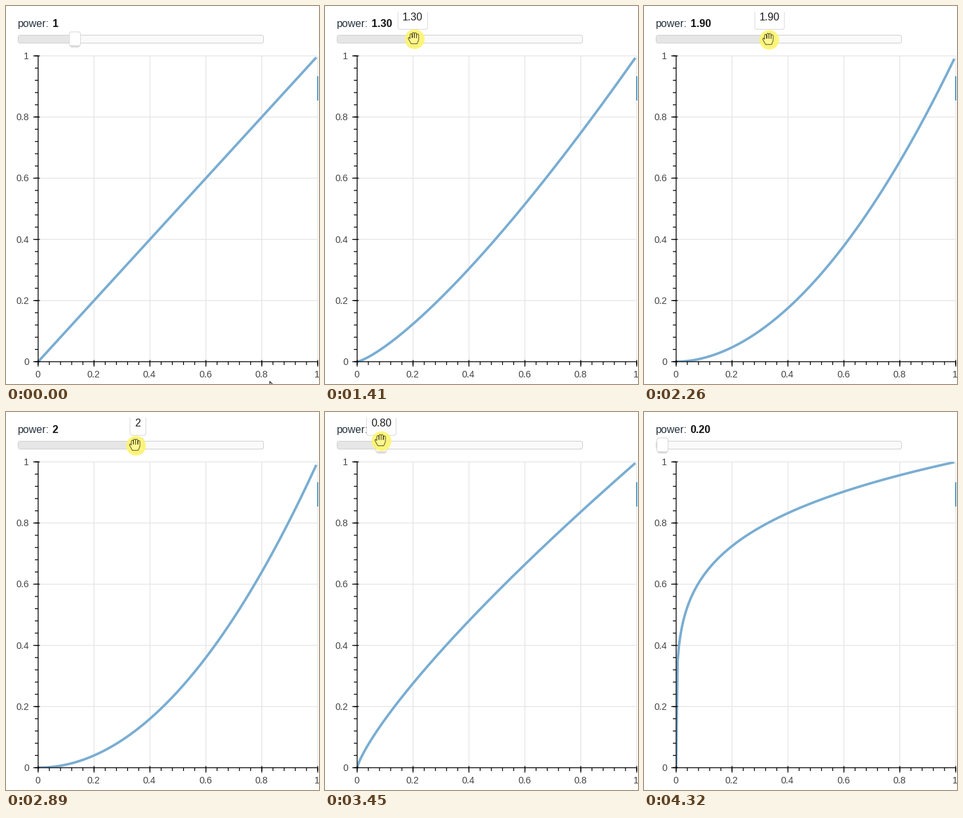
A matplotlib script that plays this animation: 477 px wide and 576 px high, repeating every 4.99 s.

```python
import numpy as np
import matplotlib.pyplot as plt
from matplotlib.animation import FuncAnimation
from matplotlib.collections import LineCollection
from matplotlib.patches import Circle, FancyBboxPatch, Polygon, Rectangle

W, H, DPI = 477, 576, 72
LOOP, STEP = 4990, 10
FPS = 24
LEFT, RIGHT, TOP, BOTTOM = 49, 475, 76, 542
FONT = "Liberation Sans"

# Pointer path: start and end (ms), shift in x and y, easing power
APPROACH = (0, 560, -295, -522, 1.8)
DRAG_OUT = (1000, 2590, 101, 2, 1.15)
DRAG_BACK = (2830, 3750, -177, -11, 1.15)
LEAVE = (4090, 4280, 420, 690, 0.6)
MOVES = (APPROACH, DRAG_OUT, DRAG_BACK, LEAVE)
POINTER_START = (402, 572)
PRESS, RELEASE = 840, 4110

ARROW = np.array([(0, 0), (0, 16), (3.7, 12.5), (6.3, 18.3), (8.6, 17.3),
                  (6.1, 11.6), (11, 11.3)])

fig = plt.figure(figsize=(W / DPI, H / DPI), dpi=DPI, facecolor="white")
ax = fig.add_axes([0, 0, 1, 1])
ax.set(xlim=(0, W), ylim=(H, 0))
ax.axis("off")


def hand_outline():
    """Four rounded fingers side by side, then the palm and the thumb."""
    angles = np.linspace(np.pi, 2 * np.pi, 5)
    points = []
    for i in range(4):
        x, tip = 3.3 * i - 4.5, -7.6 + 0.9 * (i - 1.4) ** 2
        points.append((x - 1.6, -1))
        points += [(x + 1.6 * np.cos(a), tip + 1.6 * np.sin(a)) for a in angles]
    points += [(7, 2), (4.5, 8), (-4.5, 8), (-9, 0), (-8, -2), (-6.1, 0)]
    return np.array(points) - 1


def to_x(u):
    return LEFT + (RIGHT - LEFT) * u


def to_y(v):
    return BOTTOM + (TOP - BOTTOM) * v


def segments(lines, color, z):
    # Unsnapped, so that lines on pixel borders keep their place
    ax.add_collection(LineCollection(lines, colors=color, linewidths=1.25,
                                     zorder=z, snap=False))


def round_box(x, y, w, h, radius, z, **style):
    box = FancyBboxPatch((x, y), w, h, zorder=z, boxstyle=(
        f"round,pad=0,rounding_size={radius}"), **style)
    return ax.add_patch(box)


def label(x, y, text, size, color, z=3, **style):
    return ax.text(x, y, text, fontsize=size, color=color, family=FONT,
                   va="baseline", zorder=z, **style)


def draw_plot_frame():
    major, minor = np.linspace(0, 1, 6), np.linspace(0, 1, 26)
    grid = [[(to_x(m), TOP), (to_x(m), BOTTOM)] for m in major]
    grid += [[(LEFT, to_y(m)), (RIGHT, to_y(m))] for m in major]
    segments(grid, "#e5e5e5", 1)

    ticks = [[(LEFT, TOP), (LEFT, BOTTOM)], [(LEFT, BOTTOM), (RIGHT, BOTTOM)]]
    for marks, inner, outer in ((major, 2.5, 7.5), (minor, 0, 5)):
        for m in marks:
            ticks.append([(LEFT - outer, to_y(m)), (LEFT + inner, to_y(m))])
            ticks.append([(to_x(m), BOTTOM - inner), (to_x(m), BOTTOM + outer)])
    segments(ticks, "black", 3)

    for m in major:
        label(35.3, to_y(m) + 5, f"{m:.1g}", 14.3, "#444444", ha="right")
        label(to_x(m) - 0.7, 566, f"{m:.1g}", 14.3, "#444444", ha="center")
    ax.add_patch(Rectangle((474, 107), 2, 37, color="#559fcc", lw=0, zorder=4))


draw_plot_frame()
u = np.arange(200) / 200
curve, = ax.plot([], [], color="#79add2", lw=3.75, zorder=2,
                 solid_capstyle="butt", solid_joinstyle="round")
curve.set_clip_path(Rectangle((LEFT, TOP), RIGHT - LEFT, BOTTOM - TOP,
                              transform=ax.transData))

label(18, 32, "power:", 16, "#26323c")
power_text = label(70.6, 32, "", 16, "#111111", weight="bold")

round_box(18.5, 44.5, 374, 12, 3.5, 3, fc="#fafafa", ec="#d0d0d0", lw=1)
bar = round_box(19, 45, 10, 11, 3, 3.1, fc="#e6e6e6", lw=0)
shadows = [round_box(0, 41 + k, 18 - 2 * k, 21, 3, 4, fc="#888888", lw=0,
                     alpha=0.13) for k in range(3)]
handle = round_box(0, 39.5, 17, 21, 3, 5, fc="white", ec="#d9d9d9", lw=1)

tooltip = round_box(0, 0, 24, 35.5, 3, 6, fc="white", ec="#d9d9d9", lw=1)
tooltip.set_clip_path(Rectangle((12, 9), W, H, transform=ax.transData))
tooltip_text = label(0, 22, "", 16, "#1c1c1c", 6.5, ha="center")

halo = ax.add_patch(Circle((0, 0), 15, fc="#fdf56e", lw=0, alpha=0.9, zorder=7))
cursor = ax.add_patch(Polygon(ARROW, closed=True, zorder=8))
HAND = hand_outline()


def pointer_at(t):
    pos = np.array(POINTER_START, float)
    for start, end, dx, dy, power in MOVES:
        progress = np.clip((t - start) / (end - start), 0, 1)
        pos += np.array([dx, dy]) * (1 - (1 - progress) ** power)
    return pos


def power_at(t):
    # The slider trails the pointer slightly and moves in steps of 0.1
    dragged = np.clip(t - 20, APPROACH[1], LEAVE[0])
    return round((pointer_at(dragged)[0] - 20.6) / 96 + 0.1, 1)


def update(frame):
    now = frame * STEP
    t = (now + 8) * FPS // 1000 * 1000 / FPS
    power, pos = power_at(t), pointer_at(t)
    text = f"{power:.0f}" if power == int(power) else f"{power:.2f}"
    x = 18.6 + 96 * (power - 0.1)
    pressed = PRESS <= now < RELEASE
    hover = pressed or (abs(pos[0] - x) < 12 and 37 < pos[1] < 63)

    curve.set_data(to_x(u), to_y(u ** power))
    power_text.set_text(text)
    bar.set_width(x - 19)
    handle.set_x(x - 8.5)
    for k, shadow in enumerate(shadows):
        shadow.set_x(x - 9 + k)

    half = 12 if len(text) == 1 else 22.5
    tooltip.set_x(x - half)
    tooltip.set_width(2 * half)
    tooltip_text.set_text(text)
    tooltip_text.set_x(x)
    tooltip.set_visible(hover)
    tooltip_text.set_visible(hover)

    halo.set_center(pos)
    halo.set_visible(pressed)
    cursor.set_xy(pos + (HAND if hover else ARROW))
    cursor.set_facecolor("#fdf791" if pressed else "white")
    cursor.set_edgecolor("#4a4420" if pressed else "black")
    cursor.set_linewidth(0.9 if hover else 1)
    return ()


anim = FuncAnimation(fig, update, frames=LOOP // STEP, interval=STEP,
                     repeat=True, repeat_delay=0, cache_frame_data=False)
plt.show()
```
